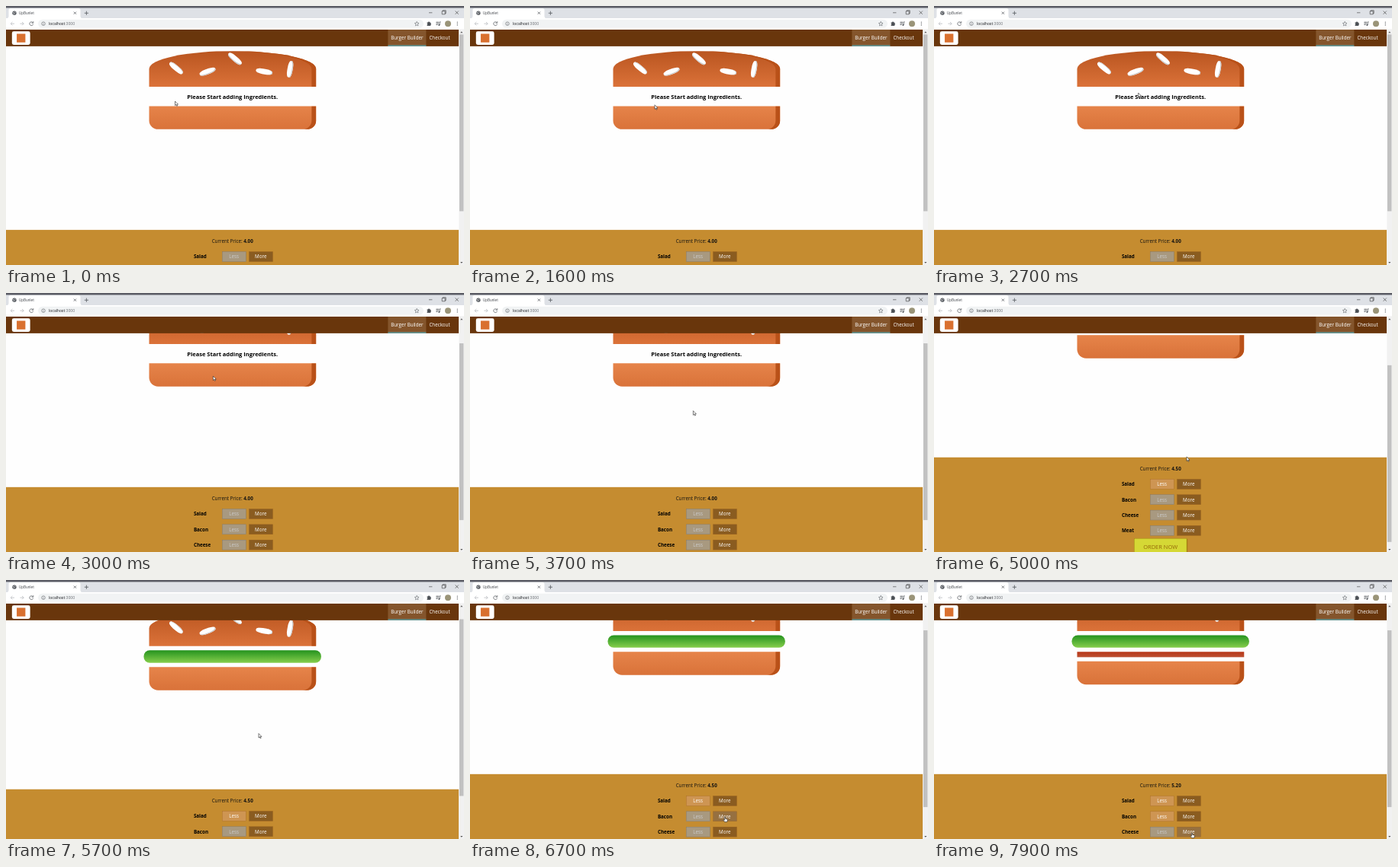
These frames come from a looping animation (600 px wide and 340 px high, 8000 ms). An HTML page:

```html
<!DOCTYPE html>
<html lang="en">
<head>
<meta charset="utf-8">
<title>Burger builder</title>
<style>
html, body { margin: 0; width: 600px; height: 340px; overflow: hidden; background: #fefefe; }
#stage { position: relative; width: 600px; height: 340px; overflow: hidden; }
#chrome, #cursor { position: absolute; left: 0; top: 0; }
#chrome { font-family: Roboto, sans-serif; }

/* Page laid out in CSS pixels of a 1536px wide screen */
#view {
  position: absolute; left: 0; top: 30.6px; width: 1519px; height: 793px; overflow: hidden;
  transform: scale(.390625); transform-origin: 0 0; background: #fefefe;
  font: 16px "Open Sans", sans-serif; color: #111;
}
#page { position: absolute; left: 0; top: 0; width: 100%; }
#burger { position: absolute; top: 72px; left: 409.5px; width: 700px; height: 600px; text-align: center; }
#burger > div { margin: 14px auto; }
#burger p { margin: 19.2px 0; font-size: 19.2px; font-weight: bold; color: #000; }
#burger .top {
  position: relative; width: 80%; height: 20%; margin-top: 0; border-radius: 50% 50% 0 0;
  background: linear-gradient(#b95520, #db7239); box-shadow: inset -15px 0 #b95118;
}
#burger .bottom {
  width: 80%; height: 13%; border-radius: 0 0 30px 30px;
  background: linear-gradient(#e6844a, #d97239); box-shadow: inset -15px 0 #b95118;
}
.salad { width: 85%; height: 7%; border-radius: 20px; background: linear-gradient(#25931f, #86ce4c); }
.bacon { width: 80%; height: 3%; background: linear-gradient(#b73516, #bd5234); }
.seeds, .seeds::before, .seeds::after { position: absolute; background: #fff; border-radius: 40%; }
.seeds { width: 10%; height: 15%; top: 50%; }
.seeds::before, .seeds::after { width: 100%; height: 100%; }
.s1 { left: 30%; transform: rotate(-20deg); box-shadow: inset -2px -3px #c9c9c9; }
.s1::after { content: ""; left: -170%; top: -260%; transform: rotate(60deg); box-shadow: inset -1px 2px #c9c9c9; }
.s1::before { content: ""; left: 180%; top: -50%; transform: rotate(60deg); box-shadow: inset -1px -3px #c9c9c9; }
.s2 { left: 64%; transform: rotate(10deg); box-shadow: inset -3px 0 #c9c9c9; }
.s2::before { content: ""; left: 150%; top: -130%; transform: rotate(90deg); box-shadow: inset 1px 3px #c9c9c9; }

#panel {
  position: absolute; top: 673px; width: 100%; padding: 10px 0; background: #c58c30;
  display: flex; flex-direction: column; align-items: center;
}
#panel p { margin: 16px 0; }
.row { display: flex; align-items: center; margin: 5px 0; }
.row b { width: 80px; padding: 10px; color: #000; }
.btn {
  box-sizing: border-box; width: 80px; margin: 0 5px; padding: 5px; text-align: center;
  border: 1px solid #a56a20; color: #fff;
}
.less { background: #ce9553; }
.less.off { background: #a89980; border-color: #7e7365; color: #ccc; }
.more { background: #8a5c20; }
.more.hover { background: #967040; }
#order {
  padding: 15px 30px; font-size: 19.2px; border: 1px solid #966909; color: #966909;
  background: #d5d835; box-shadow: 2px 2px 2px #966909;
}
#order.off { background: #c4c4c2; border-color: #ccc; color: #888; }

#bar {
  position: absolute; top: 0; left: 0; box-sizing: border-box; width: 100%; height: 56px;
  padding: 0 20px; background: #69360c; color: #fff; display: flex; justify-content: flex-end;
}
#bar span { box-sizing: border-box; height: 56px; padding: 16px 10px; }
#bar .on { background: #84552c; border-bottom: 4px solid #5f9a9c; }
#logo { position: absolute; left: 20px; top: 6px; width: 61px; height: 45px; border-radius: 6px; background: #fff; }
#logo i { position: absolute; left: 16px; top: 8px; width: 29px; height: 29px; background: #d9702f; }
</style>
</head>
<body>
<div id="stage">
  <div id="view">
    <div id="page">
      <div id="burger">
        <div class="top"><div class="seeds s1"></div><div class="seeds s2"></div></div>
        <p id="hint">Please Start adding Ingredients.</p>
        <div class="salad" id="salad"></div>
        <div class="bacon" id="bacon"></div>
        <div class="bottom"></div>
      </div>
      <div id="panel">
        <p>Current Price: <b id="price">4.00</b></p>
        <div id="order">ORDER NOW</div>
      </div>
    </div>
    <div id="bar">
      <div id="logo"><i></i></div>
      <span class="on">Burger Builder</span><span>Checkout</span>
    </div>
  </div>

  <svg id="chrome" width="600" height="340" fill="none" stroke-width=".8">
    <path fill="#dee1e6" d="M0 0H600V17H0z"/>
    <path fill="#5b5c65" d="M0 0H600V2.4H0z"/>
    <path fill="#fff" d="M0 16H600V30.6H0zM1 16.2Q3.5 16 3.5 13.5V5.5Q3.5 3 6 3H95Q97.5 3 97.5 5.5V13.5Q97.5 16 100 16.2z"/>
    <circle cx="11" cy="9.3" r="2.7" fill="#5f6368"/>
    <path stroke="#e8eaed" stroke-width=".6" d="M9 8.4L11 9.2L10.2 11.2M11.4 7.2L12.8 8.6"/>
    <text x="17" y="11.2" font-size="4.9" fill="#55585d">UpBunlet</text>
    <path stroke="#55585d" d="M88.8 7.6L92 10.8M92 7.6L88.8 10.8M102.8 9.3H108M105.4 6.7V11.9"/>
    <path stroke="#333" stroke-width=".6" d="M554 8.8H558.4M571.2 6.8H575.2V10.8H571.2zM588.6 6.6L592.8 10.8M592.8 6.6L588.6 10.8M572.2 6.8V5.8H576.2V9.8H575.2"/>
    <rect x="42" y="17.8" width="505" height="10.8" rx="5.4" fill="#f1f3f4"/>
    <path stroke="#b9bcc0" d="M11 23.2H6.2M8.4 21L6.2 23.2L8.4 25.4M18.4 23.2H23.2M21 21L23.2 23.2L21 25.4"/>
    <path stroke="#5f6368" d="M35 21.6A2.4 2.4 0 1 0 35.6 23.8M35.8 20.2V22.3H33.6"/>
    <g stroke="#5f6368" stroke-width=".6"><circle cx="49" cy="23.2" r="2.3"/><path d="M49 22.9V24.6M49 21.6V22.2"/></g>
    <text x="56" y="25" font-size="5.2" fill="#303236">localhost<tspan fill="#777a7f">:3000</tspan></text>
    <path stroke="#5f6368" stroke-width=".6" d="M538.2 20.4L539 22.3L541 22.5L539.5 23.9L539.9 25.9L538.2 24.9L536.5 25.9L536.9 23.9L535.4 22.5L537.4 22.3z"/>
    <path fill="#4d5156" d="M551.6 21.4H553A1 1 0 0 1 555 21.4H556.3V22.8A1 1 0 0 1 556.3 24.7V26H551.6V24.5A.9 .9 0 0 0 551.6 22.8z"/>
    <path stroke="#4d5156" d="M563.4 21.2H567.2M563.4 22.9H567.2M563.4 24.6H565.6M568.2 25V20.9H569.6"/>
    <circle cx="567.4" cy="25" r="1" fill="#4d5156"/>
    <circle cx="579" cy="23.2" r="4" fill="#9a9478"/>
    <g fill="#5f6368"><circle cx="591.3" cy="21.2" r=".6"/><circle cx="591.3" cy="23.2" r=".6"/><circle cx="591.3" cy="25.2" r=".6"/></g>
    <path fill="#f1f1f1" d="M593.4 30.6H600V340H593.4z"/>
    <path fill="#505050" d="M595.2 35.2L596.8 33.4L598.4 35.2zM595.2 336L596.8 337.8L598.4 336z"/>
    <rect id="thumb" x="594" y="37.4" width="5.4" height="232" fill="#c1c1c1"/>
  </svg>

  <svg id="cursor" width="10" height="12" overflow="visible" stroke="#222" stroke-width=".6" fill="#fff">
    <path id="arrow" d="M0 0V5.6L1.3 4.4L2.2 6.4L3.1 6L2.2 4.1H4z"/>
    <path id="hand" d="M-.6 .4Q0 -.4 .6 .4V2.4L3 3Q3.5 3.2 3.4 4L2.8 6.6H-.4L-2 4.2Q-1.8 3.2 -.6 4.2z"/>
  </svg>
</div>

<script>
const LOOP = 8000, SCALE = .390625, TOP = 30.6;
const SALAD_AT = 4600, BACON_AT = 6900;
const $ = id => document.getElementById(id);

// [time, scroll in CSS pixels]
const scrollSteps = [
  [0, 0], [2800, 0], [2960, 100], [3700, 100], [3860, 200], [5240, 200], [5400, 100],
  [5620, 100], [5780, 0], [6100, 0], [6260, 100], [LOOP, 100]
];
// [time, x, y] of the pointer tip
const pointerSteps = [
  [0, 221.5, 125], [1000, 221.5, 125], [1600, 242, 129.8], [2300, 262, 122], [3000, 271.3, 109],
  [3600, 290, 150], [4100, 312.5, 194], [4450, 334, 250], [4700, 334, 250], [5000, 331, 215],
  [5700, 331, 201.5], [6200, 331, 210], [6650, 334, 311], [7150, 334, 311], [7600, 338, 332], [LOOP, 338, 332]
];

const rows = ["Salad", "Bacon", "Cheese", "Meat"].map(name => {
  const row = document.createElement("div");
  row.className = "row";
  row.innerHTML = `<b>${name}</b><div class="btn less">Less</div><div class="btn more">More</div>`;
  $("panel").insertBefore(row, $("order"));
  return { less: row.children[1], more: row.children[2] };
});

const smooth = k => k * k * (3 - 2 * k);

function at(steps, t) {
  const i = Math.max(1, steps.findIndex(s => s[0] >= t));
  const a = steps[i - 1], b = steps[i];
  const k = smooth((t - a[0]) / (b[0] - a[0]));
  return a.slice(1).map((v, n) => v + (b[n + 1] - v) * k);
}

function show(id, on) { $(id).style.display = on ? "" : "none"; }

function draw(t) {
  const [scroll] = at(scrollSteps, t);
  const [x, y] = at(pointerSteps, t);
  const salad = t >= SALAD_AT, bacon = t >= BACON_AT;

  $("page").style.transform = `translateY(${-scroll}px)`;
  $("thumb").setAttribute("y", 37.4 + scroll * SCALE * .735);

  show("hint", !salad);
  show("salad", salad);
  show("bacon", bacon);
  $("price").textContent = (4 + salad * .5 + bacon * .7).toFixed(2);

  let hovering = false;
  const counts = [salad, bacon, false, false];
  rows.forEach(({ less, more }, i) => {
    const top = TOP + (746 + 51.8 * i - scroll) * SCALE;
    const over = x > 318 && x < 349.5 && y > top && y < top + 13.2;
    hovering = hovering || over;
    less.classList.toggle("off", !counts[i]);
    more.classList.toggle("hover", over);
  });

  // The order button swells briefly when it becomes active
  const k = Math.min(1, Math.max(0, (t - SALAD_AT) / 300));
  $("order").classList.toggle("off", !salad);
  $("order").style.transform = `scale(${1 + .1 * (1 - Math.abs(2 * k - 1))})`;

  $("cursor").style.transform = `translate(${x}px, ${y}px)`;
  show("arrow", !hovering);
  show("hand", hovering);
}

const start = performance.now();
function tick() {
  draw((performance.now() - start) % LOOP);
  requestAnimationFrame(tick);
}
draw(0);
requestAnimationFrame(tick);
</script>
</body>
</html>
```
